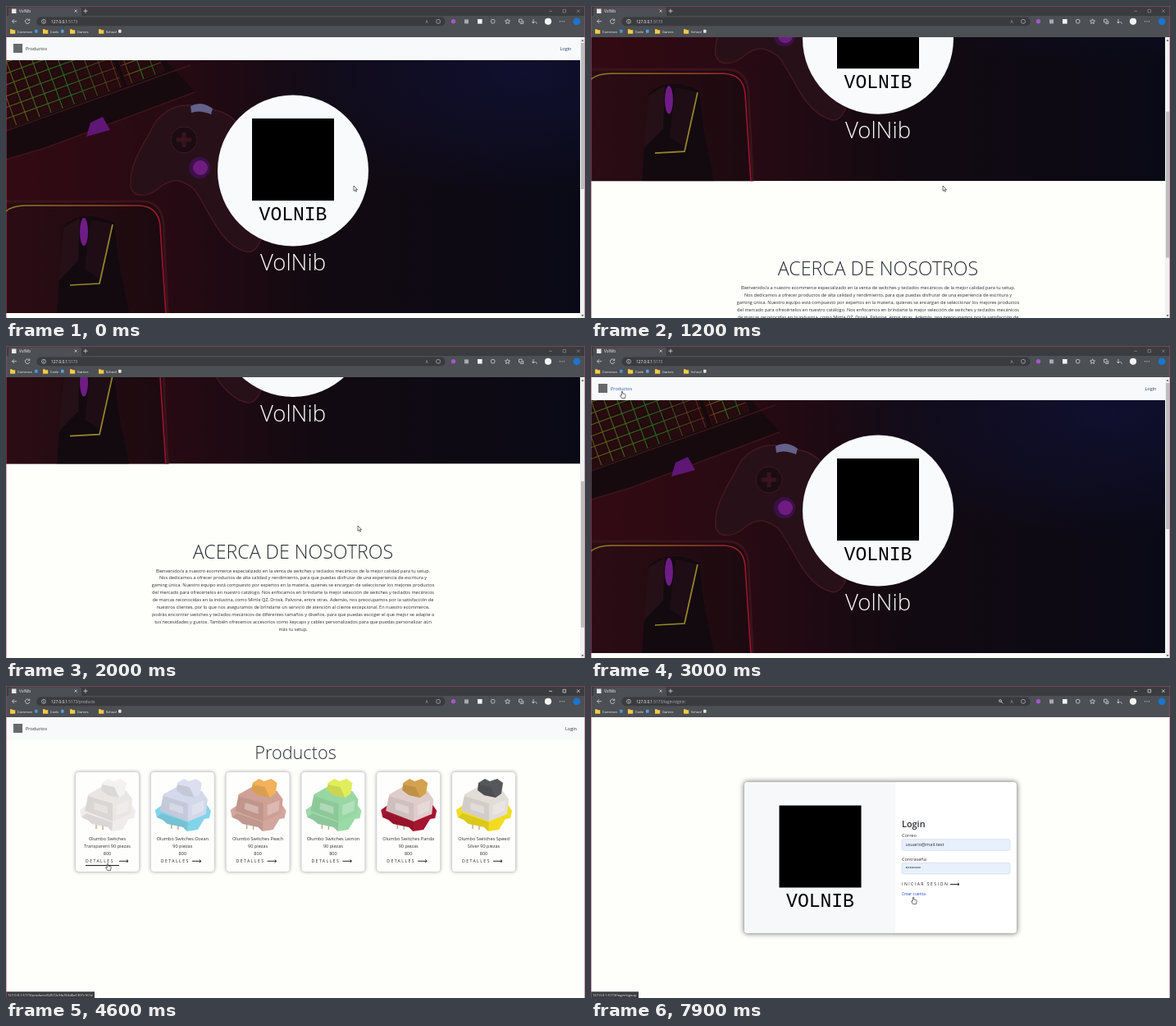
Write an HTML page that moves like this. It is 706 px wide and 380 px high and loops after 8 s.

```html
<!DOCTYPE html>
<html lang="es">
<head>
<meta charset="utf-8">
<title>VolNib</title>
<style>
html, body { margin: 0; width: 100%; height: 100%; overflow: hidden; background: #fefefb; }
svg { display: block; width: 706px; height: 380px; font-family: "Open Sans", "Noto Sans", sans-serif; fill: #2b2f33; }
.light { font-weight: 300; }
.semi { font-weight: 600; }
.cta { font-size: 5.1px; letter-spacing: 1.47px; fill: #222; }
.line { fill: none; stroke: #d8d9da; stroke-width: .8; }
.mono { font-family: "Liberation Mono", monospace; font-size: 23px; fill: #000; }
.card { filter: drop-shadow(0 0 2px #bbb) drop-shadow(0 0 1px #ccc); }
.panel { filter: drop-shadow(0 0 3px #999) drop-shadow(0 0 1px #aaa); }
</style>
</head>
<body>
<svg id="stage" viewBox="0 0 706 380"></svg>
<script>
const stage = document.getElementById('stage');
const $ = id => document.getElementById(id);
const BODY = 5.57;

const text = (x, y, size, str, extra = '') =>
  `<text x="${x}" y="${y}" font-size="${size}" ${extra}>${str}</text>`;
const mid = (x, y, size, str, extra = '') => text(x, y, size, str, 'text-anchor="middle" ' + extra);
const rect = (x, y, w, h, fill, extra = '') =>
  `<rect x="${x}" y="${y}" width="${w}" height="${h}" fill="${fill}" ${extra}/>`;
const circle = (x, y, r, fill, extra = '') => `<circle cx="${x}" cy="${y}" r="${r}" fill="${fill}" ${extra}/>`;
const poly = (points, fill, extra = '') => `<polygon points="${points}" fill="${fill}" ${extra}/>`;
const path = (d, extra = 'class="line"') => `<path d="${d}" ${extra}/>`;
const lines = (x, y, step, size, list) => list.map((s, i) => mid(x, y + i * step, size, s)).join('');

// Links: pages, hit boxes and status bar addresses
const HOST = '127.0.0.1:5173';
const ITEM = '/products/64572c9fa763d0a1307c161d';
const links = [];
const button = (page, x, y, w, label, url, statusWidth) => {
  const id = 'cta' + links.length;
  links.push({ page, id, w, url, statusWidth, box: [x, y - 6, x + w + 11, y + 4] });
  return `<g transform="translate(${x} ${y})">${text(0, 0, 5.1, label, 'class="cta"')}
    <rect id="${id}u" y="2.9" height="1" fill="#111"/>
    <path id="${id}a" d="M0-1.9h11M9-3.7l2 1.8-2 1.8" fill="none" stroke="#111" stroke-width=".9"/></g>`;
};

const nav = (loginX, id, color) => rect(0, 38, 706, 28, '#f8f9fa') +
  rect(9, 46, 11, 11, '#66696c') +
  text(24, 54, 5.5, 'Productos', `id="${id}"`) + text(loginX, 54, 5.5, 'Login', `fill="${color}"`);

const defs = `<defs>
  <linearGradient id="room"><stop offset="0" stop-color="#330a13"/><stop offset=".3" stop-color="#260a13"/>
    <stop offset=".55" stop-color="#120a11"/><stop offset="1" stop-color="#0a0a16"/></linearGradient>
  <radialGradient id="blue" cx=".9" cy=".05" r=".5"><stop stop-color="#12123a" stop-opacity=".7"/>
    <stop offset="1" stop-color="#12123a" stop-opacity="0"/></radialGradient>
  <linearGradient id="glow"><stop stop-color="#8a2a1c"/><stop offset=".3" stop-color="#7a7a1e"/>
    <stop offset=".65" stop-color="#2f8a28"/><stop offset="1" stop-color="#7c3420"/></linearGradient>
  <linearGradient id="edge"><stop stop-color="#8f8420"/><stop offset=".6" stop-color="#9a4a24"/>
    <stop offset="1" stop-color="#a01030"/></linearGradient>
  <linearGradient id="pad"><stop stop-color="#2c0c14"/><stop offset="1" stop-color="#1c0a10"/></linearGradient>
  <pattern id="keys" width="15" height="13" patternUnits="userSpaceOnUse">
    <rect width="13.8" height="11.8" fill="#1c080b"/>
    <rect x="1.5" y="1" width="11" height="9" rx="1" fill="#270b0f"/></pattern>
  <clipPath id="photo"><rect y="66" width="700" height="308"/></clipPath>
</defs>`;

const keyBlock = (x, y, w, h) => rect(x, y, w, h, 'url(#glow)', 'opacity=".75"') + rect(x, y, w, h, 'url(#keys)');

const hero = `<g clip-path="url(#photo)">
  ${rect(0, 66, 700, 308, 'url(#room)')}${rect(0, 66, 700, 308, 'url(#blue)')}
  ${poly('0,66 195,66 230,104 48,172 0,186', '#160a0e')}
  <g transform="translate(0 152) rotate(-20)">${keyBlock(-30, -120, 182, 118)}${keyBlock(158, -85, 48, 83)}</g>
  ${path('M0 152L225 72M0 187L48 173L230 105', 'fill="none" stroke="#3b141b" stroke-width="1.5"')}
  ${poly('103,142 118,135 127,151 98,159', '#5f1675')}
  ${path('M228 121C205 119 185 130 175 155C160 180 150 200 152 220C156 236 176 232 190 219C205 209 215 212 228 222C245 240 258 290 292 299C330 310 325 150 260 128Z', 'fill="#281018" stroke="#421823" stroke-width="1.5"')}
  ${path('M225 122Q238 115 252 125L250 132Q236 126 226 130Z', 'fill="#64618a"')}
  ${circle(217, 163, 16, '#1c0b12', 'stroke="#3f1822"')}
  ${path('M208 163h18M217 154v18', 'stroke="#38141e" stroke-width="5"')}
  ${circle(236, 197, 13, '#3b1048')}${circle(237, 197, 9, '#6f1c80')}
  ${path('M-5 238H165Q190 238 192 266L198 390H-5Z', 'fill="url(#pad)" stroke="#3a131b" stroke-width="3"')}
  ${path('M0 250Q8 243 24 243H162Q186 244 188 268L195 376', 'fill="none" stroke="url(#edge)" stroke-width="1.6"')}
  ${path('M70 268Q94 246 132 264L137 310L150 374H62Z', 'fill="#120a0f"')}
  ${poly('70,270 90,258 88,310 64,335', '#251018')}${poly('103,260 130,266 117,334 96,320', '#1f0d15')}
  ${path('M130 266L114 338L78 340', 'fill="none" stroke="#99872a" stroke-width="1.7"')}
  <ellipse cx="95" cy="275" rx="5" ry="17" fill="#701c86"/>
</g>`;

const mark = (x, y) => rect(x - 50, y, 100, 100, '#000') + mid(x, y + 123.5, 23, 'VOLNIB', 'class="mono"');

const about = ['Bienvenido/a a nuestro ecommerce especializado en la venta de switches y teclados mecánicos de la mejor calidad para tu setup.',
  'Nos dedicamos a ofrecer productos de alta calidad y rendimiento, para que puedas disfrutar de una experiencia de escritura y',
  'gaming única. Nuestro equipo está compuesto por expertos en la materia, quienes se encargan de seleccionar los mejores productos',
  'del mercado para ofrecértelos en nuestro catálogo. Nos enfocamos en brindarte la mejor selección de switches y teclados mecánicos',
  'de marcas reconocidas en la industria, como Mirtle QZ, Drosk, Palvone, entre otras. Además, nos preocupamos por la satisfacción de',
  'nuestros clientes, por lo que nos aseguramos de brindarte un servicio de atención al cliente excepcional. En nuestro ecommerce,',
  'podrás encontrar switches y teclados mecánicos de diferentes tamaños y diseños, para que puedas escoger el que mejor se adapte a',
  'tus necesidades y gustos. También ofrecemos accesorios como keycaps y cables personalizados para que puedas personalizar aún',
  'más tu setup.'];

const home = `<g id="home"><g id="scroll">${nav(675.5, 'navHome', '#1f3a68')}${hero}
  ${circle(350, 200.5, 92, '#f8fafb')}${mark(350, 137)}
  ${mid(350, 322, 27.5, 'VolNib', 'class="light" fill="#fff"')}
  ${mid(350, 489, 23.2, 'ACERCA DE NOSOTROS', 'class="light"')}
  ${lines(350, 506, 8.87, BODY, about)}</g>
  ${rect(700, 38, 6, 342, '#f1f1f1')}
  <rect id="thumb" x="701" width="4" height="178" fill="#bdbdbd"/>
  ${poly('701.5,43 704.5,43 703,40.5', '#666')}${poly('701.5,376 704.5,376 703,378.5', '#666')}</g>`;

// A key switch as a few flat faces on a 68 px square
const keySwitch = (x, y, k, [upper, lower, stem]) => `<g transform="translate(${x} ${y}) scale(${k})">
  ${path('M20 58v6M28 60v5', 'stroke="#c9a98c" stroke-width="1.5"')}
  ${poly('0,41 7,36 62,33 68,42 66,51 60,52 52,65 39,67 34,62 15,58 9,53 2,50', lower)}
  ${poly('2,50 9,53 15,58 34,62 39,67 40,56 8,45', '#000', 'opacity=".09"')}
  ${poly('10,22 28,12 57,18 64,28 62,46 40,55 6,42', upper)}
  ${poly('10,24 40,33 40,55 6,42', '#000', 'opacity=".07"')}
  ${poly('18,32 34,37 34,46 17,40', '#fff', 'opacity=".3"')}
  ${poly('45,35 60,29 59,42 45,48', '#fff', 'opacity=".25"')}
  ${poly('27,8 35,3 41,6 50,3 57,8 55,21 48,26 34,23 26,17', stem)}
  ${poly('27,10 42,13 48,26 34,23 26,17', '#000', 'opacity=".1"')}</g>`;

const clear = ['#eae6e4', '#efeceb', '#f4f2f1'];
const goods = [['Transparent 90 piezas', '', clear],
  ['90 piezas', ' Ocean', ['#d3d8ea', '#82d4e9', '#dcdff0']],
  ['90 piezas', ' Peach', ['#cfa096', '#d2a79e', '#f2b15a']],
  ['90 piezas', ' Lemon', ['#98d7a4', '#9bdba8', '#e1ee5c']],
  ['90 piezas', ' Panda', ['#dfcdcb', '#a51530', '#d4a24f']],
  ['Silver 90 piezas', ' Speed', ['#e3ddd8', '#f2db20', '#55575b']]];

const shop = `<g id="shop">${nav(682, 'navShop', '#333')}
  ${mid(353, 89, 21.7, 'Productos', 'class="light"')}
  ${goods.map(([second, kind, colors], i) => {
    const x = 85 + 91.8 * i;
    return rect(x, 105, 77, 121, '#fefefc', 'rx="4" class="card"') + keySwitch(x + 5, 110, 1, colors) +
      lines(x + 38.5, 188.4, 8.8, BODY, ['Olumbo Switches' + kind, second, '800']) +
      button('shop', x + 12, 215.2, 41, 'DETALLES', ITEM, 108);
  }).join('')}</g>`;

const detail = `<g id="detail">${nav(682, 'navDetail', '#333')}
  ${keySwitch(99, 97, 1.56, clear)}
  ${mid(454.5, 106, 21.5, 'Olumbo Switches Transparent', 'class="light"')}
  ${mid(454.5, 134.5, 21.5, '90 piezas', 'class="light"')}
  ${mid(454.5, 152.6, 9.5, 'Categoria: Switches', 'class="semi"')}
  ${lines(454.5, 164.2, 8.85, BODY, [
    'Similar a los Olumbo Red. La parte interior tiene una pequeña cantidad de lubricación, la carcasa es totalmente',
    'transparente, si te gusta el RGB y quieres que las luces se vean más brillantes, no te lo pierdas.',
    '$ 800', 'Aun quedan: 200', 'Rating: 5'])}
  ${button('detail', 418, 210.4, 62, 'INICIAR SESION', '/login/signin', 57)}</g>`;

const field = y => rect(379, y, 132, 13.5, '#e8f0fe', 'rx="2" stroke="#ced4da" stroke-width=".6"');
const login = `<g id="login">
  ${rect(187, 117, 332, 184, '#fff', 'rx="4" class="panel"')}
  ${path('M371 117V301H191a4 4 0 0 1-4-4V121a4 4 0 0 1 4-4Z', 'fill="#f6f8fa"')}
  ${mark(279.5, 145.5)}
  ${text(379, 172, 10.9, 'Login', 'class="semi"')}
  ${text(379, 184, BODY, 'Correo')}${field(186.7)}${text(383.5, 195.4, BODY, 'usuario@mail.test')}
  ${text(379, 212.8, BODY, 'Contraseña')}${field(215.4)}${text(383.5, 224.4, 6.2, '••••••••')}
  ${button('login', 379, 243.4, 62, 'INICIAR SESION', '', 0)}
  ${text(379, 255.2, 4.85, 'Crear cuenta', 'fill="#2446d8"')}</g>`;
links.push({ page: 'login', url: '/login/signup', statusWidth: 58, box: [379, 251, 408, 259] });
links.push({ page: 'home', nav: true, url: '', box: [22, 48, 52, 60] });

const folder = (x, label, dotX, dot) => path(`M${x} 28.3h2.4l.8 1h3v4.5h-6.2z`, 'fill="#f5c945"') +
  text(x + 8.8, 32.6, 4.25, label, 'fill="#f2f2f2"') + (dot ? rect(dotX, 28.8, 3.6, 4, dot, 'rx="1"') : '');

const chrome = `${rect(0, 0, 706, 13, '#3a3c3f')}${rect(0, 12, 706, 26, '#4c4f53')}
  ${path('M3 13V4Q3 1.5 6 1.5H89Q92 1.5 92 4V13Z', 'fill="#4c4f53"')}
  ${rect(7, 3.5, 5.5, 5.5, '#e8e8e8')}${text(16, 8, 4.6, 'VolNib', 'fill="#f2f2f2"')}
  ${path('M83.6 4.6l3 3m0-3l-3 3M97 3.6v5M94.5 6.1h5')}
  <g id="controls">${path('M662 6.3h4M679 4.3h3.6v3.6H679zM696 4.3l3.7 3.7m0-3.7l-3.7 3.7')}</g>
  ${path('M13 18.7H7.5M10 16.2l-2.5 2.5 2.5 2.5M28.4 17.2a2.7 2.7 0 1 0 .4 2.2M28.8 15.6v2h-2')}
  ${rect(37.5, 13.6, 498, 10.6, '#393b3f', 'rx="5"')}
  ${circle(46, 18.8, 2.5, 'none', 'stroke="#d0d0d0" stroke-width=".7"')}${path('M46 18.4v1.8M46 17v.6')}
  ${text(55, 20.5, 4.75, '127.0.0.1<tspan id="url" fill="#b3b5b8"></tspan>', 'fill="#fff"')}
  <g id="key">${circle(499, 18, 1.4, 'none', 'class="line"')}${path('M500 19l2.4 2.2')}</g>
  ${text(511.5, 20.6, 5, 'A', 'fill="#a8aaad"')}
  ${circle(527, 18.8, 2.5, 'none', 'stroke="#a8aaad" stroke-width=".8"')}
  ${circle(545.5, 18.8, 2.7, '#a457c9')}${rect(559, 16.4, 5, 5, '#a9abad')}${rect(575, 16, 5.6, 5.6, '#f4f4f4')}
  ${rect(591.5, 16.5, 4.4, 4.4, 'none', 'rx="1.4" class="line"')}
  ${path('M611.5 15.8l.9 2 2.1.2-1.6 1.4.5 2.1-1.9-1.1-1.9 1.1.5-2.1-1.6-1.4 2.1-.2z')}
  ${path('M625.5 16.2h3.6v3.6h-3.6zM627 21.4h3.8v-3.6M643 16v5M645.5 19l2 2.6M641.5 19l1.5 2 1.5-2')}
  ${circle(661, 18.8, 4.1, '#f3f3f3')}
  ${[675.5, 678, 680.5].map(x => circle(x, 18.8, .6, '#ddd')).join('')}
  ${circle(696, 18.8, 4.4, '#1c74d0')}
  ${folder(5, 'Common', 35, '#4c92e0')}${folder(45, 'Code', 67, '#5a9de0')}
  ${folder(78, 'Games')}${folder(113, 'School', 137, '#e6e2d6')}`;

const overlay = `<g id="status"><rect id="statusBox" y="372.3" height="8" fill="#3a3c40"/>
  ${text(2, 377.9, 4.15, '', 'id="statusText" fill="#eee"')}</g>
  ${path('M.3 380V.3H705.7V380', 'fill="none" stroke="#b5566e" stroke-width=".6"')}
  <g id="cursor" stroke="#111" stroke-width=".6" fill="#fff">
    <path id="arrow" d="M0 0V6.3L1.5 5L2.5 7.2L3.5 6.8L2.6 4.6H4.5Z"/>
    <path id="hand" d="M-.7.5Q0-.5.7.5V3L3.6 3.7Q4.3 4 4.1 5L3.5 8.6H-.4L-2.4 5.3Q-2.3 4.2-.7 5.2Z"/></g>`;

stage.innerHTML = defs + home + shop + detail + login + chrome + overlay;

// Keys are [time, value, ...]; values ease between neighbours
const along = (keys, t, ease = u => u * u * (3 - 2 * u)) => {
  const i = keys.findIndex(k => k[0] > t);
  if (i < 0) return keys[keys.length - 1].slice(1);
  if (!i) return keys[0].slice(1);
  const [a, b] = [keys[i - 1], keys[i]];
  const u = ease((t - a[0]) / (b[0] - a[0]));
  return a.slice(1).map((v, n) => v + (b[n + 1] - v) * u);
};

const scrollKeys = [[800, 0], [900, 28.5], [1400, 249], [1600, 288], [1900, 288], [2400, 0]];
const pointerKeys = [[0, 424, 219], [700, 429, 219], [2400, 429, 219], [2900, 38, 55], [3200, 38, 55],
  [3700, 575, 140], [4000, 480, 213], [4500, 124, 216], [4800, 124, 216], [5500, 466, 203], [5600, 470, 210],
  [5700, 470, 212], [6100, 470, 212], [6700, 444, 201], [7100, 420, 240], [7500, 400, 243], [7600, 396, 249],
  [7700, 393, 257]];
const pages = [['home', 0, ''], ['shop', 3200, '/products'], ['detail', 4800, ITEM], ['login', 6100, '/login/signin']];

const pageAt = t => pages.filter(p => p[1] <= t).pop();
const hovered = (link, t) => {
  const [x, y] = along(pointerKeys, t);
  const [x0, y0, x1, y1] = link.box;
  return pageAt(t)[0] === link.page && x >= x0 && x <= x1 && y >= y0 && y <= y1;
};
const show = (id, on) => $(id).setAttribute('display', on ? 'inline' : 'none');

function draw(t) {
  const [page, , address] = pageAt(t);
  pages.forEach(([id]) => show(id, id === page));
  $('url').textContent = ':5173' + address;
  show('key', page === 'login');
  $('controls').setAttribute('opacity', page === 'home' ? .45 : 1);

  const [top] = along(scrollKeys, t, u => u);
  $('scroll').setAttribute('transform', `translate(0 ${-top})`);
  $('thumb').setAttribute('y', 45 + top * .52);

  const before = Math.max(0, t - 100);
  for (const link of links.filter(l => l.id)) {
    const p = (hovered(link, t) + hovered(link, before)) / 2;
    $(link.id + 'u').setAttribute('width', link.w * p);
    $(link.id + 'a').setAttribute('transform', `translate(${link.w + 3 * (p - 1)} 0)`);
  }

  const over = links.find(link => hovered(link, t));
  $('navHome').setAttribute('fill', over && over.nav ? '#2a55b0' : '#333');
  show('status', over && over.url);
  if (over && over.url) {
    $('statusBox').setAttribute('width', over.statusWidth);
    $('statusText').textContent = HOST + over.url;
  }
  const [x, y] = along(pointerKeys, t);
  $('cursor').setAttribute('transform', `translate(${x} ${y})`);
  show('hand', over);
  show('arrow', !over);
}

// Motion advances in steps of 100 ms
function tick() {
  draw(Math.floor(performance.now() % 8000 / 100) * 100);
  requestAnimationFrame(tick);
}
tick();
</script>
</body>
</html>
```
